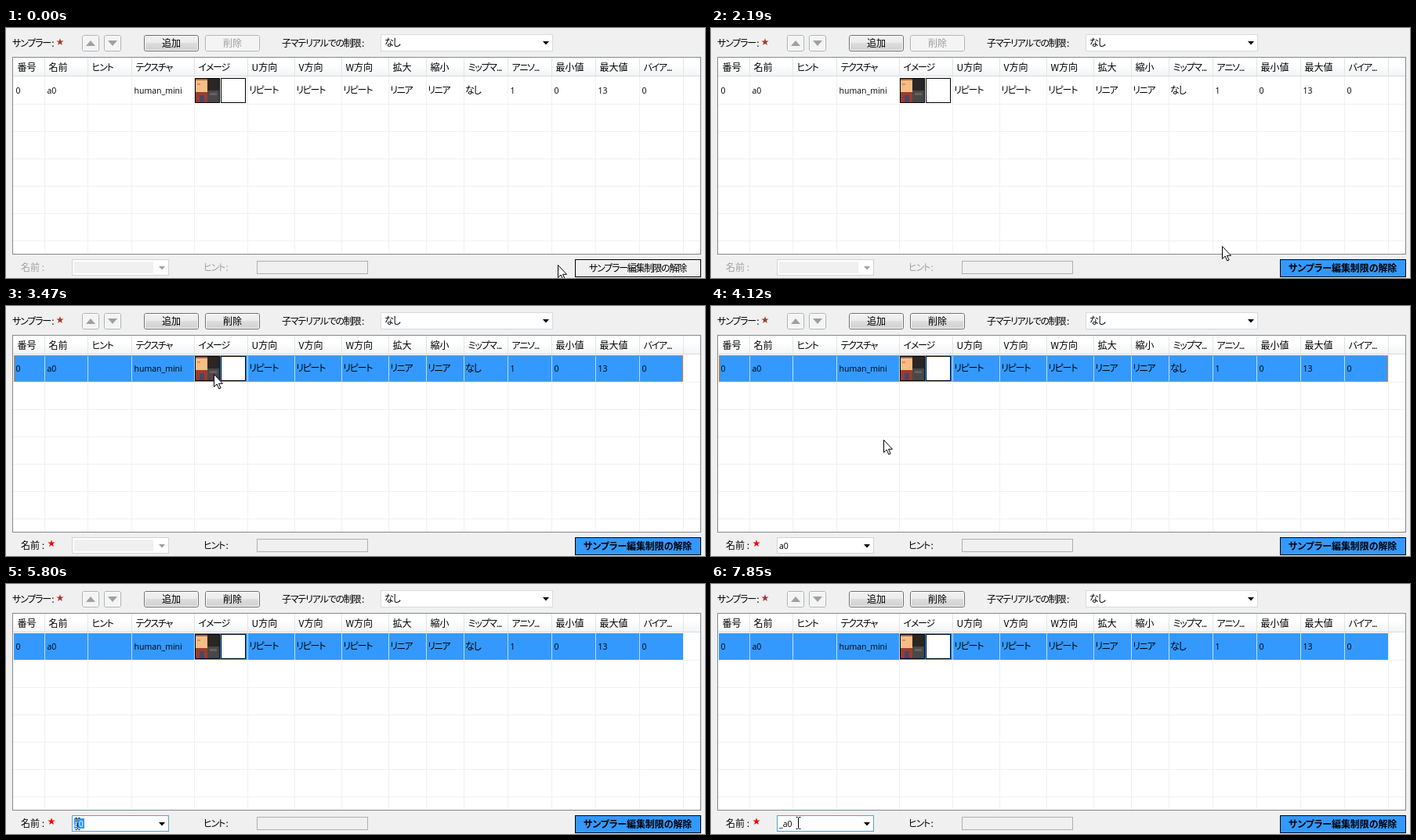
Animation, 892 px wide and 320 px high, one loop 7990 ms. Source, as an HTML page:

```html
<!DOCTYPE html>
<html lang="ja">
<meta charset="utf-8">
<title>サンプラー</title>
<style>
html, body { margin: 0; width: 100%; height: 100%; overflow: hidden; background: #f0f0f0 }
svg { display: block }
text { font: 12px 'Noto Sans CJK JP', 'Noto Sans CJK', sans-serif; font-feature-settings: 'palt'; white-space: pre }
.kana { letter-spacing: -1.2px }
.latin { font: 10.5px 'Open Sans', 'Noto Sans', sans-serif }
.bold { font-weight: 700; letter-spacing: -.1px }
#beam { mix-blend-mode: difference }
</style>
<svg id="stage" width="892" height="320" viewBox="0 0 892 320"></svg>
<script>
const LOOP = 7990, STEP = 128.3, BLUE = '#3399ff', GREY = '#a0a0a0';

// Heading, width, cell
let edge = 9;
const columns = [
  ['番号', 40, '0'], ['名前', 55, 'a0'], ['ヒント', 56, ''], ['テクスチャ', 80, 'human_mini'], ['イメージ', 68, ''],
  ['U方向', 60, 'リピート'], ['V方向', 60, 'リピート'], ['W方向', 60, 'リピート'],
  ['拡大', 48, 'リニア'], ['縮小', 48, 'リニア'], ['ミップマ...', 56, 'なし'], ['アニソ...', 56, '1'],
  ['最小値', 56, '0'], ['最大値', 56, '13'], ['バイア...', 56, '0']
].map(([head, width, cell]) => ({ head, cell, left: edge, right: edge += width }));

// Pointer route: time, x, y
const route = [[250, 704, 303], [900, 736, 304], [1800, 736, 304], [2181, 652, 279], [2437, 524, 277],
  [2823, 322, 136], [3208, 265, 87], [3593, 265, 87], [4106, 220, 171], [4363, 195, 269],
  [4748, 110, 306], [5518, 91, 307], [7570, 91, 307], [7826, 111, 306]];

function pointer(t) {
  const slot = Math.floor((t + 15) / STEP) * STEP;
  const i = route.findIndex(p => p[0] > slot);
  if (i < 1) return route.at(i).slice(1);
  const [a, b] = [route[i - 1], route[i]], k = (slot - a[0]) / (b[0] - a[0]);
  return [1, 2].map(n => Math.round(a[n] + (b[n] - a[n]) * k));
}

const rect = (x, y, w, h, fill, more = '') =>
  `<rect x="${x}" y="${y}" width="${w}" height="${h}" fill="${fill}" ${more}/>`;
const box = (x, y, w, h, fill, line, more = '') =>
  rect(x + .5, y + .5, w - 1, h - 1, fill, `stroke="${line}" ${more}`);
const path = (d, fill, more = '') => `<path d="${d}" fill="${fill}" ${more}/>`;
const group = (id, body) => `<g id="${id}">${body}</g>`;
const script = s => /[\u3040-\u30ff]/.test(s) ? 'kana' : /^[ -~]*$/.test(s) ? 'latin' : '';
const text = (x, y, s, fill = '#000', more = '') =>
  `<text x="${x}" y="${y}" fill="${fill}" class="${script(s)}" ${more}>${s}</text>`;

function star(x, y, fill) {
  let d = '';
  for (let i = 0; i < 10; i++) {
    const r = i % 2 ? 2 : 4.8, a = i * Math.PI / 5;
    d += (i ? 'L' : 'M') + (x + r * Math.sin(a)).toFixed(2) + ' ' + (y - r * Math.cos(a)).toFixed(2);
  }
  return path(d + 'z', fill);
}

const button = (x, w, label, on) =>
  box(x, 9, w, 21, on ? 'url(#face)' : '#f4f4f4', on ? '#707070' : '#adb2b5', 'rx="2.5"') +
  box(x + 1, 10, w - 2, 19, 'none', '#fcfcfc', 'rx="1.5"') +
  (label ? text(x + w / 2, 24, label, on ? '#000' : GREY, 'text-anchor="middle"') : '');

const arrow = (x, y, fill) => path(`M${x - 4} ${y}h8l-4 4.5z`, fill);

function grid() {
  let s = box(8, 37, 879, 253, '#fff', '#828790') + rect(9, 38, 877, 23, 'url(#head)') +
    rect(9, 61, 877, 1, '#d9dadb');
  for (let y = 97; y < 290; y += 35) s += rect(9, y, 877, 1, '#f0f0f0');
  for (const c of columns)
    s += rect(c.right, 62, 1, 227, '#f0f0f0') + rect(c.right, 38, 1, 23, '#e0e3e7') + text(c.left + 5.5, 55, c.head);
  return s;
}

const selectedRow = () => rect(10, 63, 854, 34, BLUE) +
  columns.slice(0, -1).map(c => rect(c.right, 63, 1, 34, '#c4defa')).join('');

const rowText = () =>
  columns.map(c => text(c.left + (script(c.cell) === 'kana' ? 2 : 3.5), 84, c.cell)).join('');

const thumbs = () =>
  box(241, 64, 32, 32, '#2a2625', '#000') +
  rect(242, 65, 15, 17, '#f6bd85') + rect(242, 65, 15, 2, '#b5603c') + rect(244, 71, 4, 2, '#d98f5c') +
  rect(242, 82, 15, 13, '#9c3d2c') + rect(247, 86, 6, 9, '#4d4468') +
  rect(257, 80, 15, 15, '#484849') + rect(260, 83, 9, 3, '#68605d') +
  box(274, 64, 32, 32, '#fff', '#000');

stage.innerHTML = `<defs>
  <linearGradient id="face" x2="0" y2="1"><stop stop-color="#f2f2f2"/><stop offset=".5" stop-color="#ebebeb"/>
    <stop offset=".5" stop-color="#ddd"/><stop offset="1" stop-color="#cfcfcf"/></linearGradient>
  <linearGradient id="head" x2="0" y2="1"><stop offset=".4" stop-color="#fff"/><stop offset="1" stop-color="#f2f3f5"/></linearGradient>
  </defs>` + rect(0, 0, 892, 320, '#f0f0f0') +
  text(8, 24, 'サンプラー :') + star(69, 18, '#a83a2c') +
  button(97, 22) + path('M102 23h12l-6-7z', GREY) + button(125, 22) + path('M130 16h12l-6 7z', GREY) +
  button(176, 70, '追加', true) +
  group('deleteOff', button(254, 70, '削除')) + group('deleteOn', button(254, 70, '削除', true)) +
  text(352, 24, '子マテリアルでの制限 :') +
  box(478, 8, 220, 22, '#fff', '#d6d9df') + text(483, 23, 'なし') + arrow(689, 17, '#000') +
  grid() + group('picked', selectedRow()) + thumbs() + rowText() +
  group('focus', box(10, 63, 854, 34, 'none', '#d9822b')) +
  group('labelsOff', text(19, 311, '名前 :', GREY) + text(252, 311, 'ヒント :', GREY)) +
  group('labelsOn', text(19, 311, '名前 :') + text(252, 311, 'ヒント :') + star(58, 304, '#f00')) +
  box(84, 296, 124, 21, '#fff', '#d0d3d8') +
  rect(87, 299, 101, 15, '#f0f0f0') + arrow(199, 305, GREY) +
  group('combo', rect(85, 297, 122, 19, '#fff') + arrow(199, 305, '#000') +
    rect(87, 300, 13, 13, BLUE, 'id="mark"') + text(87, 311, 'a0', '#000', 'id="value"')) +
  group('comboHot', box(84, 296, 124, 21, 'none', '#5c9fd0')) +
  group('caret', rect(87, 299, 1, 13, '#000')) +
  box(320, 298, 142, 17, '#f0f0f0', '#afafaf') +
  box(726, 296, 161, 23, '#f0f0f0', '#000', 'id="unlock"') +
  text(806, 312, 'サンプラー編集制限の解除', '#000', 'id="unlockText" text-anchor="middle"') +
  group('hand', path('M.5.5v16l3.7-3.5 2.6 6 2.3-1-2.6-5.7h5z', '#fff', 'stroke="#000"')) +
  group('beam', path('M-3-7.5h2l1 1 1-1h2M0-6.5v13M-3 7.5h2l1-1 1 1h2', 'none', 'stroke="#fff" transform="translate(.5)"'));

const el = id => document.getElementById(id);
const show = (id, on) => el(id).style.display = on ? '' : 'none';
const within = (t, a, b) => t >= a && t < b;

function draw(t) {
  const picked = t >= 3470, unlocked = t >= 1410, typing = t >= 4640;
  show('deleteOff', !picked);
  show('deleteOn', picked);
  show('picked', picked);
  show('labelsOff', !picked);
  show('labelsOn', picked);
  show('focus', within(t, 3470, 4910));
  show('comboHot', t >= 4770);

  const marked = within(t, 5410, 5920);
  el('combo').style.opacity = Math.min(1, Math.max(0, (t - 3470) / 390));
  show('mark', marked);
  el('value').setAttribute('fill', marked ? '#fff' : '#000');
  el('value').textContent = t < 7220 ? 'a0' : '_a0';
  show('caret', within(t, 6300, 6830));

  const hover = within(t, 640, 1930);
  el('unlock').setAttribute('fill', unlocked ? (hover ? '#2e8ae6' : BLUE) : hover ? '#dcdce0' : '#f0f0f0');
  el('unlockText').setAttribute('class', unlocked ? 'bold' : 'kana');

  show('hand', !typing);
  show('beam', typing && !within(t, 6300, 7730));
  el(typing ? 'beam' : 'hand').setAttribute('transform', `translate(${pointer(t)})`);
}

function tick() {
  draw(performance.now() % LOOP);
  requestAnimationFrame(tick);
}
tick();
</script>
</html>
```
